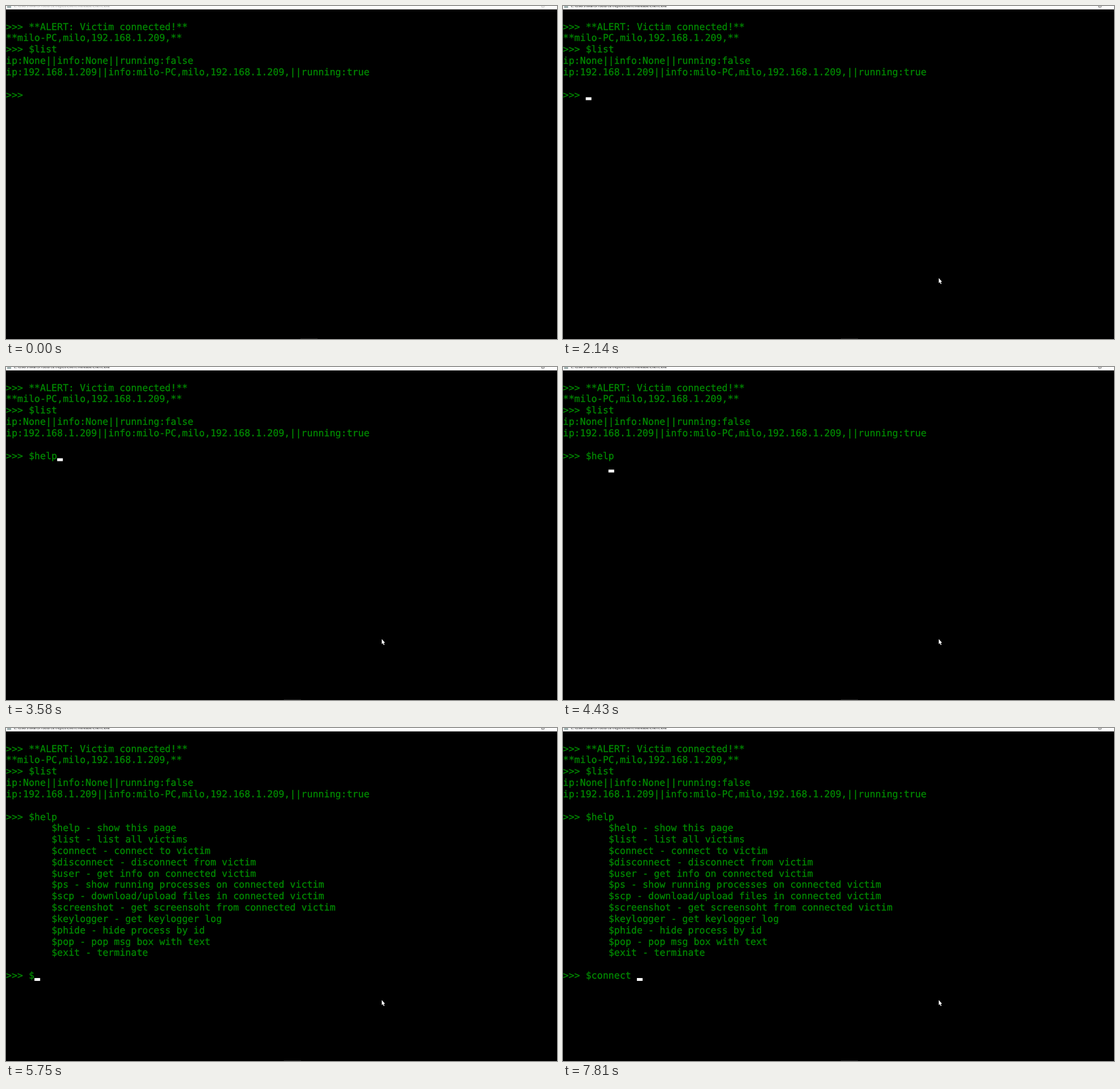
Animation of 962 by 582 pixels, one loop 8000 ms. Source, as an HTML page with a canvas:

```html
<!DOCTYPE html>
<html lang="en">
<head>
<meta charset="utf-8">
<title>Terminal session</title>
<style>
  html, body { margin: 0; width: 100%; height: 100%; overflow: hidden; background: #000; }
  canvas { display: block; }
</style>
</head>
<body>
<canvas id="stage" width="962" height="582"></canvas>
<script>
const ctx = document.getElementById('stage').getContext('2d');
const LOOP = 8000;
const FONT_SIZE = 16.485, CELL = 9.925, ROW = 19.82, FIRST_BASELINE = 41.6;
const GREEN = '#008a00';
const FOCUS_TIME = 1610, ENTER_TIME = 4430, HELP_TIME = 4540;
const PROMPT = '>>> ', PROMPT_ROW = 6, NEXT_PROMPT_ROW = 20;

const intro = [
  '>>> **ALERT: Victim connected!**',
  '**milo-PC,milo,192.168.1.209,**',
  '>>> $list',
  'ip:None||info:None||running:false',
  'ip:192.168.1.209||info:milo-PC,milo,192.168.1.209,||running:true'
];

const help = [
  '$help - show this page',
  '$list - list all victims',
  '$connect - connect to victim',
  '$disconnect - disconnect from victim',
  '$user - get info on connected victim',
  '$ps - show running processes on connected victim',
  '$scp - download/upload files in connected victim',
  '$screenshot - get screensoht from connected victim',
  '$keylogger - get keylogger log',
  '$phide - hide process by id',
  '$pop - pop msg box with text',
  '$exit - terminate'
];

// [time, typed text, caret visible]
const firstCommand = [
  [0, '', false], [2140, '', true], [2720, '$', true], [3000, '$h', true],
  [3210, '$he', true], [3440, '$hel', true], [3580, '$help', true],
  [3730, '$help', false], [4280, '$help', true], [ENTER_TIME, '$help', false]
];
const secondCommand = [
  [HELP_TIME, '', true], [5360, '', false], [5750, '$', true], [5880, '$', false],
  [6320, '$c', true], [6420, '$c', false], [6520, '$co', true], [6710, '$con', true],
  [7010, '$conn', true], [7370, '$conne', true], [7430, '$connec', false],
  [7580, '$connect', true], [7810, '$connect ', true]
];

const baseline = row => FIRST_BASELINE + row * ROW;

function rect(color, x, y, w, h) {
  ctx.fillStyle = color;
  ctx.fillRect(x, y, w, h);
}

// A hairline stroke gives the console face its slightly heavier weight.
function printLine(text, row, column = 0) {
  const x = column * CELL, y = Math.round(baseline(row));
  ctx.fillStyle = ctx.strokeStyle = GREEN;
  ctx.lineWidth = 0.3;
  ctx.fillText(text, x, y);
  ctx.strokeText(text, x, y);
}

function drawCaret(row, column) {
  rect('#fff', column * CELL, baseline(row) - 1, CELL, 5);
}

function drawCommand(states, row, t) {
  const [, typed, caret] = states.findLast(state => state[0] <= t);
  printLine(PROMPT + typed, row);
  if (caret) drawCaret(row, PROMPT.length + typed.length);
}

function drawWindowFrame(focused) {
  const ink = focused ? '#000' : '#999';
  rect('#fff', 0, 0, 962, 6);
  rect('#9fb0b0', 2, 0, 7, 3.5);
  ctx.font = '6.6px "Open Sans", sans-serif';
  ctx.fillStyle = ink;
  ctx.fillText('C:\\Users\\Maron\\source\\repos\\client\\Release\\client.exe', 13.6, 2.3);
  ctx.strokeStyle = ink;
  ctx.lineWidth = 0.6;
  ctx.strokeRect(935.5, -2, 4, 4);
  rect('#262626', focused ? 485 : 514, 581, 30, 1);
}

function pointerPosition(t) {
  if (t < 430) return null;
  if (t >= 1000) return [656, 475.5];
  const p = Math.min(5, Math.floor((t - 430) / 80)) / 5;
  return [557 + 57 * p, 564 - 75.5 * (1 - (1 - p) ** 1.4)];
}

function drawPointer(position) {
  if (!position) return;
  ctx.save();
  ctx.translate(...position);
  ctx.fillStyle = '#fff';
  ctx.fill(new Path2D('M0 0V8.8L2 7L3.4 10.4L4.8 9.8L3.5 6.5H5.8Z'));
  ctx.restore();
}

function draw(t) {
  rect('#000', 0, 0, 962, 582);
  drawWindowFrame(t >= FOCUS_TIME);
  ctx.font = `${FONT_SIZE}px "DejaVu Sans Mono", monospace`;
  intro.forEach((line, i) => printLine(line, i));
  drawCommand(firstCommand, PROMPT_ROW, t);
  if (t >= HELP_TIME) {
    help.forEach((line, i) => printLine(line, PROMPT_ROW + 1 + i, 8));
    drawCommand(secondCommand, NEXT_PROMPT_ROW, t);
  } else if (t >= ENTER_TIME) {
    drawCaret(PROMPT_ROW + 1, 8);
  }
  drawPointer(pointerPosition(t));
}

ctx.textRendering = 'geometricPrecision';
const start = performance.now();
function tick() {
  draw((performance.now() - start) % LOOP);
  requestAnimationFrame(tick);
}
tick();
</script>
</body>
</html>
```
